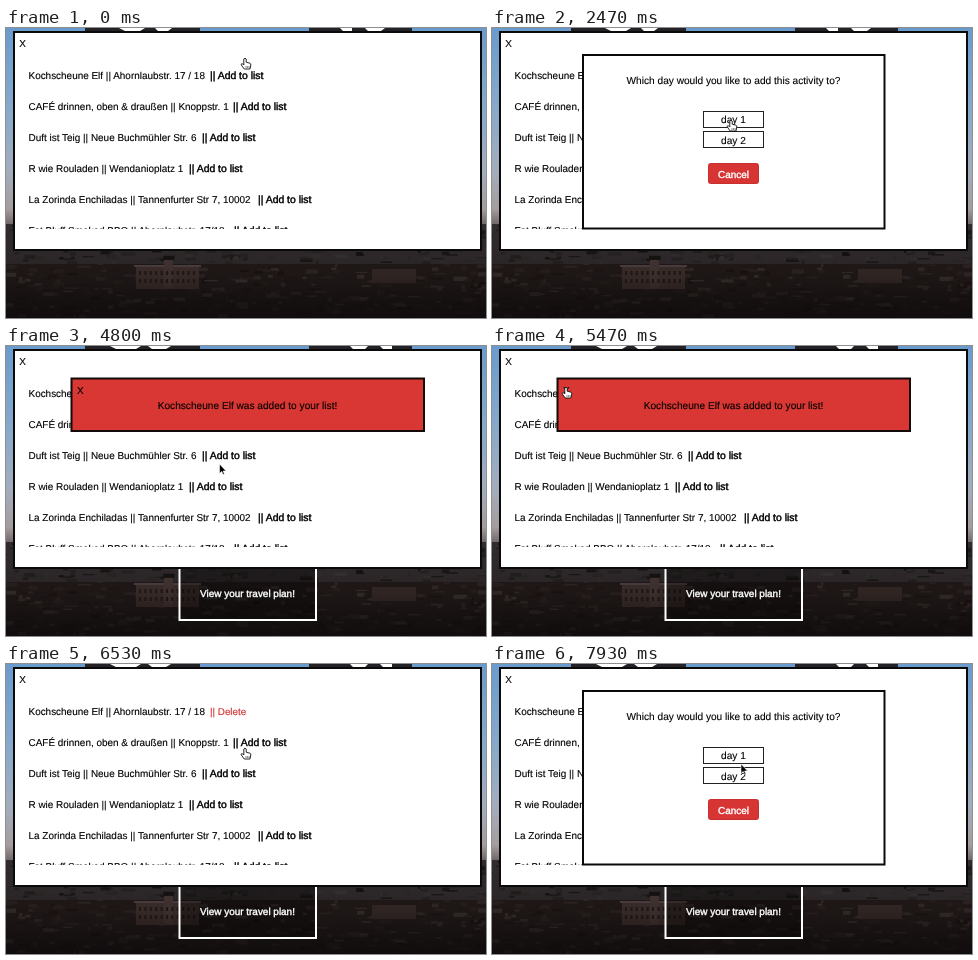
An HTML page that plays this animation: 480x290 px, repeating every 8 s.

```html
<!DOCTYPE html>
<html lang="en">
<head>
<meta charset="utf-8">
<title>Travel planner</title>
<style>
  html, body { margin: 0; width: 100%; height: 100%; overflow: hidden; background: #0f0c0d; }
  svg { display: block; width: 480px; height: 290px; }
  text {
    font: 9.95px "Liberation Sans", Arial, sans-serif; white-space: pre;
    text-rendering: geometricPrecision; stroke: #000; stroke-width: .12px;
  }
  .mid { text-anchor: middle; font-size: 10.15px; }
  .link { font-size: 10.4px; stroke-width: .42px; }
  .delete { fill: #cf2f2d; stroke: #cf2f2d; font-size: 9.8px; }
  .light { fill: #fff; stroke: #fff; stroke-width: .4px; font-size: 9.95px; }
  .panel { fill: #fff; stroke: #0a0a0a; stroke-width: 2; }
  .option { fill: #fff; stroke: #222; stroke-width: 1; }
</style>
</head>
<body>
<svg viewBox="0 0 480 290">
  <defs>
    <linearGradient id="sky" x2="0" y2="1">
      <stop offset="0" stop-color="#6a9bcd"/>
      <stop offset=".4" stop-color="#86a9cb"/>
      <stop offset=".72" stop-color="#a3adbd"/>
      <stop offset=".92" stop-color="#a59c9d"/>
      <stop offset="1" stop-color="#6e6566"/>
    </linearGradient>
    <linearGradient id="shade" x2="0" y2="1">
      <stop offset="0" stop-color="#0c090a" stop-opacity="0"/>
      <stop offset=".55" stop-color="#0c090a" stop-opacity=".25"/>
      <stop offset="1" stop-color="#0c090a" stop-opacity=".8"/>
    </linearGradient>
    <clipPath id="scroller"><rect x="9" y="4" width="466" height="197"/></clipPath>
  </defs>

  <rect width="480" height="197" fill="url(#sky)"/>
  <rect y="196" width="480" height="40" fill="#322c2e"/>
  <rect y="236" width="480" height="54" fill="#231b1a"/>
  <g id="city"></g>
  <rect y="196" width="480" height="94" fill="url(#shade)"/>

  <path d="M79 0H194V3H79ZM303 0H406V3H303Z" fill="#232327"/>
  <path id="iconsBefore" d="M113 0H139L134 3H119ZM149 0H166L162 3H152ZM334 0H346V3H337ZM359 0H379L375 3H362Z" fill="#fff"/>
  <path id="iconsAfter" d="M104 0H135L130 3H110ZM142 0H165L160 3H146ZM344 0H362L359 3H347ZM374 0H386V3H377Z" fill="#fff"/>

  <g id="plan">
    <rect x="173.5" y="200" width="136.5" height="74" fill="#000" fill-opacity=".3" stroke="#fff" stroke-width="2"/>
    <text class="mid light" x="241.5" y="251">View your travel plan!</text>
  </g>

  <rect class="panel" x="8" y="4" width="467" height="218"/>
  <text x="13.3" y="19">X</text>
  <g id="rows" clip-path="url(#scroller)"></g>

  <g id="dialog">
    <rect class="panel" x="91" y="27" width="301.5" height="173.5"/>
    <text class="mid" x="241.5" y="56">Which day would you like to add this activity to?</text>
    <rect class="option" x="211.5" y="83.5" width="60" height="16"/>
    <text class="mid" x="241.5" y="95">day 1</text>
    <rect class="option" x="211.5" y="103.5" width="60" height="16"/>
    <text class="mid" x="241.5" y="115.5">day 2</text>
    <rect x="216.5" y="135.5" width="50" height="20" rx="2" fill="#d73533" stroke="#c92f2e"/>
    <text class="mid light" x="241.5" y="149.5">Cancel</text>
  </g>

  <g id="notice">
    <rect x="65.5" y="32.5" width="352.5" height="52.5" fill="#d93733" stroke="#140a0a" stroke-width="2"/>
    <text x="71" y="48">X</text>
    <text class="mid" x="241.5" y="62.5">Kochscheune Elf was added to your list!</text>
  </g>

  <g id="cursor">
    <path id="arrow" d="M0 0V9.5L2.2 7.4 3.6 10.6 5 10 3.6 7H6.6Z" fill="#000" stroke="#fff" stroke-width=".6"/>
    <g id="hand" stroke="#111" stroke-width=".9" stroke-linejoin="round">
      <path d="M-1.2 1Q0-.8 1.2 1V4.2L5 5.2Q6 5.6 5.8 7L5 11H-.8L-3.8 6.8Q-3.8 5.2-2.4 5.8L-1.2 7Z" fill="#fff"/>
      <path d="M1 8V10M2.6 8V10M4.1 8V10" stroke-width=".5"/>
    </g>
  </g>
</svg>
<script>
const FPS = 15, FRAMES = 120;
const $ = id => document.getElementById(id);

function add(parent, tag, attrs, content = '') {
  const el = document.createElementNS('http://www.w3.org/2000/svg', tag);
  for (const key in attrs) el.setAttribute(key, attrs[key]);
  el.textContent = content;
  parent.append(el);
  return el;
}

// Rooftops and facades
let seed = 11;
const random = () => (seed = seed * 16807 % 2147483647) / 2147483647;
function block(x, y, width, height, fill) {
  add($('city'), 'rect', { x, y, width, height, fill });
}
for (let i = 0; i < 520; i++) {
  const y = 197 + random() * 90, tone = 16 + random() * 36, warmth = y > 234 ? 11 : 4;
  block(random() * 490 - 10, y, 2 + random() * 12, 1 + random() * 3.5,
    `rgb(${tone + warmth},${tone + 2},${tone})`);
}
block(130, 239, 63, 22, '#43332f');
block(128, 237, 67, 2, '#56474a');
block(158, 232, 9, 29, '#4a3a37');
for (let i = 0; i < 22; i++) block(133 + i % 11 * 5.4, 243 + (i > 10) * 8, 2, 4, '#241b1a');
block(366, 241, 44, 14, '#3a2d2a');

// Name and address, then where the link begins
const places = [
  ['Kochscheune Elf || Ahornlaubstr. 17 / 18', 204],
  ['CAFÉ drinnen, oben & draußen || Knoppstr. 1', 227],
  ['Duft ist Teig || Neue Buchmühler Str. 6', 196],
  ['R wie Rouladen || Wendanioplatz 1', 183],
  ['La Zorinda Enchiladas || Tannenfurter Str 7, 10002', 252],
  ['Fat Bluff Smoked BBQ || Ahornlaubstr. 17/18', 228],
];
const links = places.map(([label, x], i) => {
  const y = 51 + 31 * i;
  add($('rows'), 'text', { x: 22.5, y }, label);
  return add($('rows'), 'text', { x, y, class: 'link' }, '|| Add to list');
});
const deleteLink = add($('rows'), 'text', { x: 204, y: 51, class: 'delete' }, '|| Delete');

// Pointer: step, x, y, and the shape it takes from there on
const pointer = [
  [0, 239, 30, 'hand'], [3, 245, 40, 'hand'], [6, 241, 53, 'hand'], [9, 236, 46, 'hand'],
  [13, 236, 46, 'arrow'], [24, 236, 46, 'arrow'], [29, 217, 64, 'arrow'], [33, 222, 84, 'hand'],
  [37, 239, 92, 'hand'], [61, 239, 91, 'arrow'], [69, 239, 91, 'arrow'], [73, 205, 127, 'arrow'],
  [78, 112, 82, 'arrow'], [81, 77, 44, 'hand'], [82, 74, 41, 'hand'], [87, 74, 41, 'arrow'],
  [89, 74, 41, 'arrow'], [94, 170, 66, 'arrow'], [97, 234, 82, 'hand'], [98, 239, 84, 'hand'],
  [99, 239, 84, 'hand'], [103, 249, 77, 'hand'], [108, 249, 77, 'arrow'], [115, 249, 77, 'arrow'],
  [117, 243, 90, 'arrow'], [119, 249, 100, 'arrow'], [120, 249, 100, 'arrow'],
];

const show = (el, on) => { el.style.display = on ? '' : 'none'; };

function render(step) {
  const i = pointer.findLastIndex(key => key[0] <= step);
  const [start, x, y, shape] = pointer[i], [end, nextX, nextY] = pointer[i + 1];
  const p = (step - start) / (end - start);
  $('cursor').setAttribute('transform', `translate(${x + (nextX - x) * p} ${y + (nextY - y) * p})`);
  show($('hand'), shape === 'hand');
  show($('arrow'), shape === 'arrow');

  show($('dialog'), step >= 13 && step < 61 || step >= 108);
  show($('notice'), step >= 61 && step < 87);
  show($('iconsBefore'), step < 63);
  show($('iconsAfter'), step >= 63);
  show($('plan'), step >= 66);
  show(links[0], step < 87);
  show(deleteLink, step >= 87);
}

const origin = performance.now();
function tick() {
  const time = performance.now() - origin;
  render(Math.floor((time + 3.4) * FPS / 1000) % FRAMES);
  requestAnimationFrame(tick);
}
tick();
</script>
</body>
</html>
```
